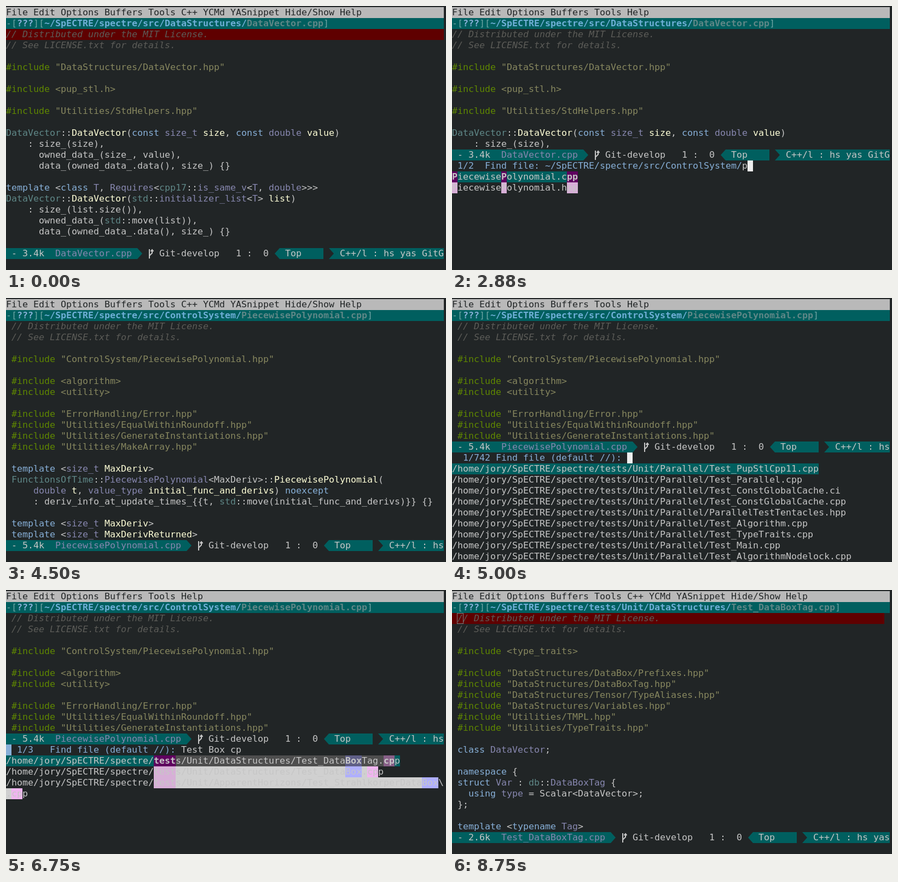
An HTML page for the animation above (8870 ms loop, 804 by 482 pixels).

```html
<!DOCTYPE html>
<html lang="en">
<head>
<meta charset="utf-8">
<title>Finding files in Emacs</title>
<style>
html, body { margin: 0; width: 100%; height: 100%; overflow: hidden; background: #212526; }
#term { position: absolute; left: 0; top: 2px; width: 800px; height: 480px; overflow: hidden;
  font: 16.61px/20px "DejaVu Sans Mono", monospace; color: #c6c6c6; }
.row { position: relative; height: 20px; overflow: hidden; white-space: pre; }
.row span { display: inline-block; height: 20px; vertical-align: top; }
.row i, .row svg { position: absolute; top: 0; height: 20px; }
.row b { position: relative; font-weight: inherit; }
.menu { background: #b9b9b9; color: #212526; }
.head { background: #005f5f; color: #6fa5a5; }
.hl { background: linear-gradient(#5f0000, #5f0000) no-repeat; }
.bar { background: #005f5f; }
.box { box-sizing: border-box; left: 9px; width: 12px; border: 1px solid #808080; }
/* syntax */
.c { color: #5c5c58; font-style: italic; }
.g { color: #5f8700; }
.s { color: #87875f; }
.k { color: #87afd7; }
.t { color: #8787af; }
.n { color: #5f8787; }
.v { color: #ffffd7; }
.f { color: #ffffd7; }
.q { color: #87afd7; font-weight: bold; }
.h { color: #6fafd7; font-weight: bold; }
.e { color: #5f8787; font-weight: bold; }
/* completion list */
.d { color: #d78700; }
.m1 { background: #d0d0d0; }
.m2 { background: #d7afd7; }
.m3 { background: #afafff; }
.m4 { background: #efb5ef; }
.cur { background: #005f5f; }
.cur.m1 { background: #4e4e4e; }
.cur.m2 { background: #5f005f; font-weight: bold; }
.cur.m3 { background: #5f5f87; font-weight: bold; }
.cur.m4 { background: #875f87; font-weight: bold; }
.block { background: #eeeeee; }
.start { background: #87afd7; }
</style>
</head>
<body>
<div id="term"></div>
<script>
const LOOP = 8870, COLS = 80, ROWS = 24;
const term = document.getElementById("term");

const esc = s => s.replace(/&/g, "&amp;").replace(/</g, "&lt;");
const span = (cls, s) => `<span class="${cls}">${s}</span>`;
const row = (html, cls = "", style = "") => `<div class="row ${cls}" style="${style}">${html}</div>`;
// «k text» gives the text the class k
const mark = s => esc(s).replace(/«(\w) ([^»]*)»/g, (_, c, x) => span(c, x));

const license = "«c // Distributed under the MIT License.»\n«c // See LICENSE.txt for details.»\n\n";
const inc = (...names) => names.map(n => `«g #include» «s ${n}»`).join("\n") + "\n";
const ours = (...names) => inc(...names.map(n => `"${n}.hpp"`));

function buffer(path, name, size, indent, code) {
  return { path, name, size, indent, lines: (license + code).split("\n") };
}

const vector = buffer("src/DataStructures/", "DataVector.cpp", "3.4k", 0,
ours("DataStructures/DataVector") + "\n" + inc("<pup_stl.h>") + "\n" + ours("Utilities/StdHelpers") + `
«n DataVector»::«f DataVector»(«k const» «t size_t» «v size», «k const» «t double» «v value»)
    : size_(size),
      owned_data_(size_, value),
      data_(owned_data_.data(), size_) {}

«k template» <«k class» «t T», «t Requires»<«n cpp17»::«t is_same_v»<«t T», «t double»>>>
«n DataVector»::«f DataVector»(«n std»::«t initializer_list»<«t T»> «v list»)
    : size_(list.size()),
      owned_data_(«n std»::move(list)),
      data_(owned_data_.data(), size_) {}`);

const poly = buffer("src/ControlSystem/", "PiecewisePolynomial.cpp", "5.4k", 1,
ours("ControlSystem/PiecewisePolynomial") + "\n" + inc("<algorithm>", "<utility>") + "\n" +
ours("ErrorHandling/Error", "Utilities/EqualWithinRoundoff", "Utilities/GenerateInstantiations",
  "Utilities/MakeArray") + `
«k template» <«t size_t» «v MaxDeriv»>
«n FunctionsOfTime»::«t PiecewisePolynomial»<MaxDeriv>::«f PiecewisePolynomial»(
    «t double» «v t», «t value_type» «v initial_func_and_derivs») «k noexcept»
    : deriv_info_at_update_times_{{t, «n std»::move(initial_func_and_derivs)}} {}

«k template» <«t size_t» «v MaxDeriv»>
«k template» <«t size_t» «v MaxDerivReturned»>`);

const boxTag = buffer("tests/Unit/DataStructures/", "Test_DataBoxTag.cpp", "2.6k", 1,
inc("<type_traits>") + "\n" +
ours("DataStructures/DataBox/Prefixes", "DataStructures/DataBoxTag", "DataStructures/Tensor/TypeAliases",
  "DataStructures/Variables", "Utilities/TMPL", "Utilities/TypeTraits") + `
«k class» «t DataVector»;

«k namespace» {
«k struct» «t Var» : «n db»::«t DataBoxTag» {
  «k using» «t type» = Scalar<DataVector>;
};

«k template» <«k typename» «t Tag»>`);

const words = s => s.split(" ");
const dir = (path, names) => ({ prompt: "Find file: ~/SpECTRE/spectre/src/" + path, digits: 2, names: words("./ ../ " + names) });
const structures = dir("DataStructures/", "DataBox/ Tensor/ CMakeLists.txt DataVector.cpp DataVector.hpp " +
  "Index.cpp Index.hpp Matrix.hpp MakeWithValue.hpp Variables.hpp");
const src = dir("", "ApparentHorizons/ ControlSystem/ DataStructures/ Domain/ ErrorHandling/ Evolution/ Executables/ " +
  "IO/ Informer/ NumericalAlgorithms/ Options/ Parallel/ PointwiseFunctions/ Time/ Utilities/ CMakeLists.txt");
const control = dir("ControlSystem/", "CMakeLists.txt PiecewisePolynomial.cpp PiecewisePolynomial.hpp");
const unit = (folder, names) => words(names).map(n => `/home/jory/SpECTRE/spectre/tests/Unit/${folder}/${n}`);
const project = { prompt: "Find file (default //): ", digits: 3, names: [
  ...unit("Parallel", "Test_PupStlCpp11.cpp Test_Parallel.cpp Test_ConstGlobalCache.ci Test_ConstGlobalCache.cpp " +
    "ParallelTestTentacles.hpp Test_Algorithm.cpp Test_TypeTraits.cpp Test_Main.cpp Test_AlgorithmNodelock.cpp"),
  ...unit("DataStructures", "Test_DataBoxTag.cpp Test_DataBox.cpp"),
  ...unit("ApparentHorizons", "Test_StrahlkorperDataBox.cpp"),
  ...unit("Utilities", "Test_Blas.cpp") ] };

// [start, buffer, list, input, match count, cursor at line start]; no list: true highlights the first line
const script = [
  [0, vector, null, true],
  [250, vector, structures, ""],
  [1000, vector, src, ""],
  [1750, vector, src, "C"],
  [1880, vector, src, "Co"],
  [2000, vector, src, "Con"],
  [2250, vector, control, ""],
  [2880, vector, control, "p"],
  [3130, vector, control, "p "],
  [3380, vector, control, "p c"],
  [3500, vector, control, "p cp"],
  [3880, vector, control, "p cpp"],
  [4500, poly, null, false],
  [4750, poly, project, "", 742],
  [5130, poly, project, "T", 742],
  [5250, poly, project, "Te", 368],
  [5380, poly, project, "Tes", 155],
  [5500, poly, project, "Test", 153],
  [5630, poly, project, "Test ", 153],
  [5750, poly, project, "Test B", 31],
  [5880, poly, project, "Test Bo"],
  [6000, poly, project, "Test Box"],
  [6250, poly, project, "Test Box "],
  [6500, poly, project, "Test Box c"],
  [6750, poly, project, "Test Box cp", 3, true],
  [7000, boxTag, null, false],
  [7500, boxTag, null, true],
];

function matcher(input) {
  const parts = input.trim();
  return parts && new RegExp("(" + parts.split(/ +/).join(")(.*?)(") + ")", "gi");
}

// Colours a candidate by matched words and the gaps between them, then wraps it
function candidate(name, re, current) {
  const base = (current ? "cur " : "") + (name.endsWith("/") ? "d " : "");
  const cells = [...name].map(ch => [ch, base]);
  if (re) for (const m of name.matchAll(re)) {
    let at = m.index;
    m.slice(1).forEach((part, g) => {
      for (const _ of part) cells[at++][1] = base + (g % 2 ? "m1" : "m" + (2 + g / 2));
    });
  }
  const paint = part => {
    let html = "";
    for (let i = 0, j; i < part.length; i = j) {
      for (j = i; j < part.length && part[j][1] === part[i][1];) j++;
      html += span(part[i][1], part.slice(i, j).map(c => c[0]).join(""));
    }
    return html;
  };
  if (cells.length <= COLS) return [row(paint(cells))];
  return [row(paint(cells.slice(0, COLS - 1)) + "\\"), row(paint(cells.slice(COLS - 1)))];
}

function bar(x, width, shape) {
  return `<i class="bar" style="left:${x}px;width:${width}px;clip-path:polygon(${shape})"></i>`;
}

function modeLine({ name, size }) {
  const x = (name.length + 10) * 10;
  return row(
    bar(0, x + 9, "0 0, calc(100% - 9px) 0, 100% 50%, calc(100% - 9px) 100%, 0 100%") +
    bar(x + 251, 89, "9px 0, 100% 0, 100% 100%, 9px 100%, 0 50%") +
    bar(x + 350, 800, "0 0, 100% 0, 100% 100%, 0 100%, 9px 50%") +
    `<svg width="10" style="left:${x + 20}px" fill="none" stroke="#c6c6c6" stroke-width="2">` +
    `<path d="M2 2V19M7 5V9L2 14M4.5 6L7 3L9.5 6"/></svg>` +
    `<b> - ${size}  ${span("t", name)}     Git-develop   1 :  0   Top       C++/l : hs yas GitG</b>`);
}

function panel(list, input, count, atStart) {
  const re = matcher(input);
  const found = list.names.filter(n => !re || n.search(re) >= 0);
  const total = String(count || found.length).padEnd(list.digits);
  const counter = "1".padStart(list.digits) + "/" + total + " ";
  const prompt = atStart
    ? span("start", " ") + span("k", counter.slice(1) + list.prompt) + input
    : span("k", counter + list.prompt) + input + span("block", " ");
  return [row(prompt), ...found.flatMap((n, i) => candidate(n, re, i === 0))];
}

function screen([, buf, list, input, count, atStart]) {
  const menu = "File Edit Options Buffers Tools " + (list ? "" : "C++ YCMd YASnippet Hide/Show ") + "Help";
  const rows = [
    row(menu, "menu"),
    row(mark(`-[«q ???»][«h ~/SpECTRE/spectre/${buf.path}»«e ${buf.name}»]`), "head"),
  ];
  const end = list ? 13 : 22;
  for (let r = 2; r < end; r++) {
    const lit = r === 2 && !list && input;
    const cursor = lit && buf.indent ? '<i class="box"></i>' : "";
    rows.push(row(" ".repeat(buf.indent) + mark(buf.lines[r - 2] || "") + cursor,
      lit ? "hl" : "", lit ? `background-size:${800 - 10 * buf.indent}px 20px` : ""));
  }
  rows.push(modeLine(buf));
  if (list) rows.push(...panel(list, input, count, atStart));
  return rows.slice(0, ROWS).join("");
}

let shown;
function frame() {
  const t = performance.now() % LOOP;
  const step = script.findLast(s => s[0] <= t);
  if (step !== shown) term.innerHTML = screen(shown = step);
  requestAnimationFrame(frame);
}
frame();
</script>
</body>
</html>
```
